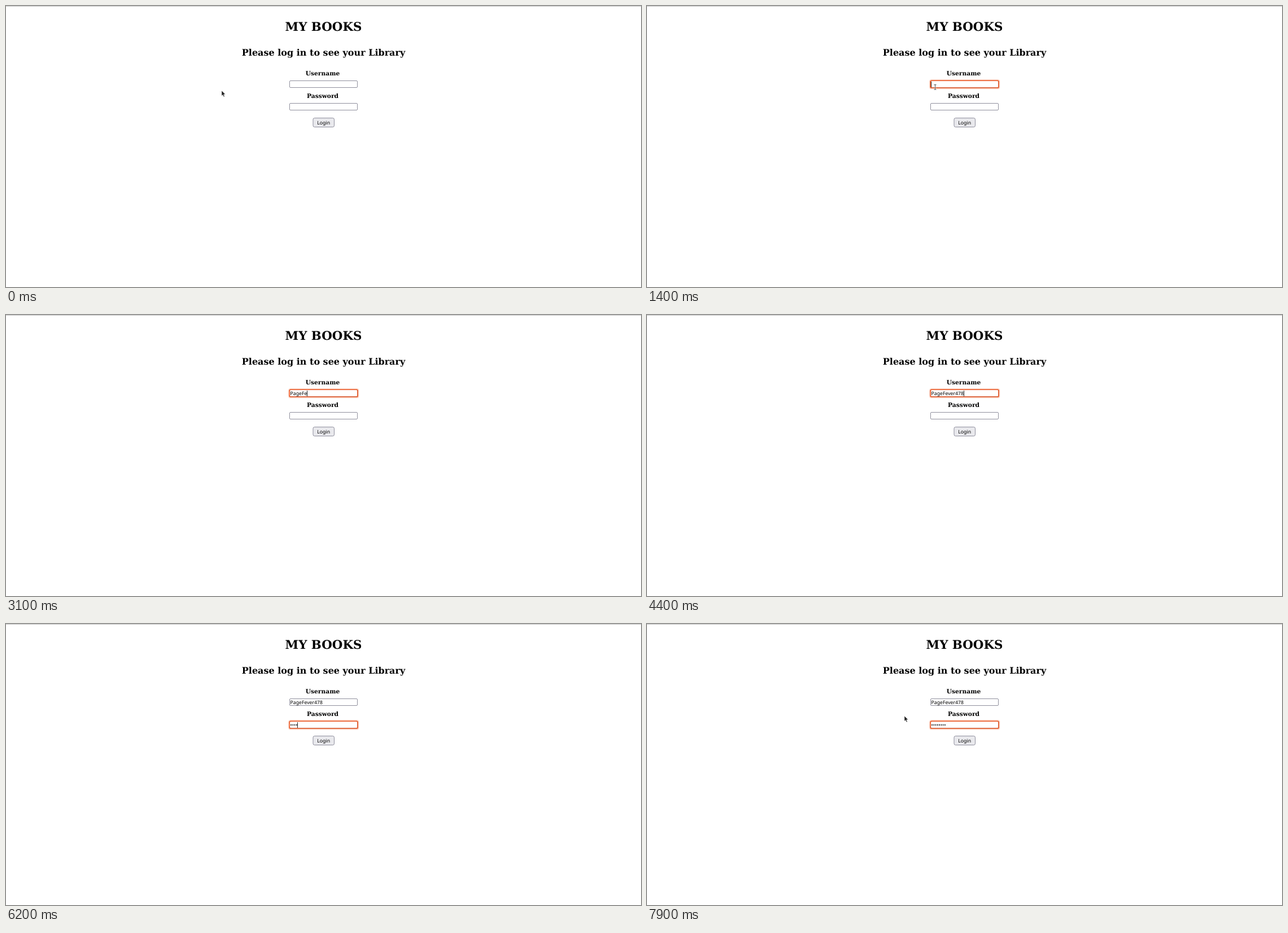
Write an HTML page that moves like this. It is 1125 px wide and 498 px high and loops after 8000 ms.

```html
<!DOCTYPE html>
<html lang="en">
<head>
<meta charset="utf-8">
<title>My Books</title>
<style>
  html, body { margin: 0; width: 100%; height: 100%; overflow: hidden; background: #fff; }
  svg { display: block; width: 100%; height: 100%; }
  text { text-rendering: geometricPrecision; white-space: pre; }
  .heading { font-family: "DejaVu Serif", serif; font-weight: bold; text-anchor: middle; }
  .ui { font-family: "Noto Sans", sans-serif; font-size: 8.7px; }
  .box { fill: #fff; stroke: #8f8f9d; }
  .hover .box { stroke: #676774; }
  .ring, .caret { visibility: hidden; }
  .ring { fill: none; }
  .focus .ring { visibility: visible; }
  .caret { fill: #222; }
</style>
</head>
<body>
<svg viewBox="0 0 1125 498">
  <rect width="1125" height="1" fill="#c4c4c4"/>
  <g class="heading">
    <text x="562.5" y="44" font-size="21.33">MY BOOKS</text>
    <text x="562.5" y="88" font-size="16">Please log in to see your Library</text>
    <text x="561" y="122.7" font-size="10.67">Username</text>
    <text x="561" y="162.5" font-size="10.67">Password</text>
  </g>
  <g id="fields"></g>
  <rect x="544" y="198.5" width="37.5" height="16" rx="2.7" fill="#e9e9ed" stroke="#8f8f9d"/>
  <text class="ui" x="562.7" y="210" text-anchor="middle">Login</text>
  <g id="pointer">
    <path id="arrow" d="M0 0V9.2L2.1 7.4L3.8 11L5.3 10.3L3.7 6.8L6.6 6.5Z" fill="#222" stroke="#fff" stroke-width=".5"/>
    <g id="beam" fill="none">
      <path d="M-2-4.5H2M0-4.5V4M-2 4H2" stroke="#fff" stroke-width="1.8"/>
      <path d="M-2-4.5H2M0-4.5V4M-2 4H2" stroke="#444" stroke-width=".9"/>
    </g>
  </g>
</svg>
<script>
const LOOP = 8000;
const TEXT_X = 503.6;
const $ = id => document.getElementById(id);

// [time, x, y, shape]; each pose holds until the next
const pointerPath = [
  [0, 382, 150, "arrow"], [500, 396, 150, "arrow"], [600, 432, 148, "arrow"],
  [700, 470, 145, "arrow"], [800, 495, 143, "arrow"], [900, 506, 143.5, "beam"],
  [1000, 510.5, 144, "beam"], [1600, 484, 147, "arrow"], [1700, 444, 152, "arrow"],
  [1800, 424, 153, "arrow"], [2200, 0, 0, "none"], [7900, 456, 163, "arrow"]
];

// Each key time adds one character
const username = makeField(132.5, "PageFever478", 8.7,
  [2100, 2400, 2700, 2700, 2900, 3100, 3300, 3500, 3700, 4000, 4200, 4400], 1400, 4900, 4900);
const password = makeField(172.5, "•".repeat(8), 8.6,
  [5300, 5700, 6100, 6200, 6600, 6900, 7000, 7400], 4900, LOOP, 7400);

function makeField(y, value, size, keyTimes, focusAt, blurAt, caretOffAt) {
  const group = document.createElementNS("http://www.w3.org/2000/svg", "g");
  group.innerHTML = `
    <rect class="box" x="502.5" y="${y}" width="120" height="12" rx="1.5"/>
    <rect class="ring" x="501" y="${y - 1.5}" width="123.5" height="15.5" rx="3" stroke="#fbd9cc" stroke-width="2"/>
    <rect class="ring" x="502.3" y="${y - .2}" width="120.7" height="12.7" rx="1.8" stroke="#e95420" stroke-width="1.6"/>
    <text class="ui" x="${TEXT_X}" y="${y + 9.6}" style="font-size:${size}px"></text>
    <rect class="caret" y="${y + 1.5}" width="1" height="10"/>`;
  $("fields").append(group);
  const text = group.querySelector("text");
  const caret = group.querySelector(".caret");

  return (t, hovered) => {
    const focused = t >= focusAt && t < blurAt;
    group.classList.toggle("focus", focused);
    group.classList.toggle("hover", hovered && !focused);
    const typed = value.slice(0, keyTimes.filter(k => k <= t).length);
    if (text.textContent !== typed) text.textContent = typed;
    const width = typed ? text.getComputedTextLength() : 0;
    caret.setAttribute("x", Math.floor(TEXT_X + width));
    caret.style.visibility = focused && t < caretOffAt ? "visible" : "hidden";
  };
}

function draw(now) {
  const t = now % LOOP;
  const [, x, y, shape] = pointerPath.findLast(pose => pose[0] <= t);
  $("pointer").setAttribute("transform", `translate(${x} ${y})`);
  for (const id of ["arrow", "beam"]) $(id).style.display = id === shape ? "" : "none";
  username(t, shape === "beam");
  password(t, false);
  requestAnimationFrame(tick);
}

let start;
function tick(now) {
  start ??= now;
  draw(now - start);
}
requestAnimationFrame(tick);
</script>
</body>
</html>
```
